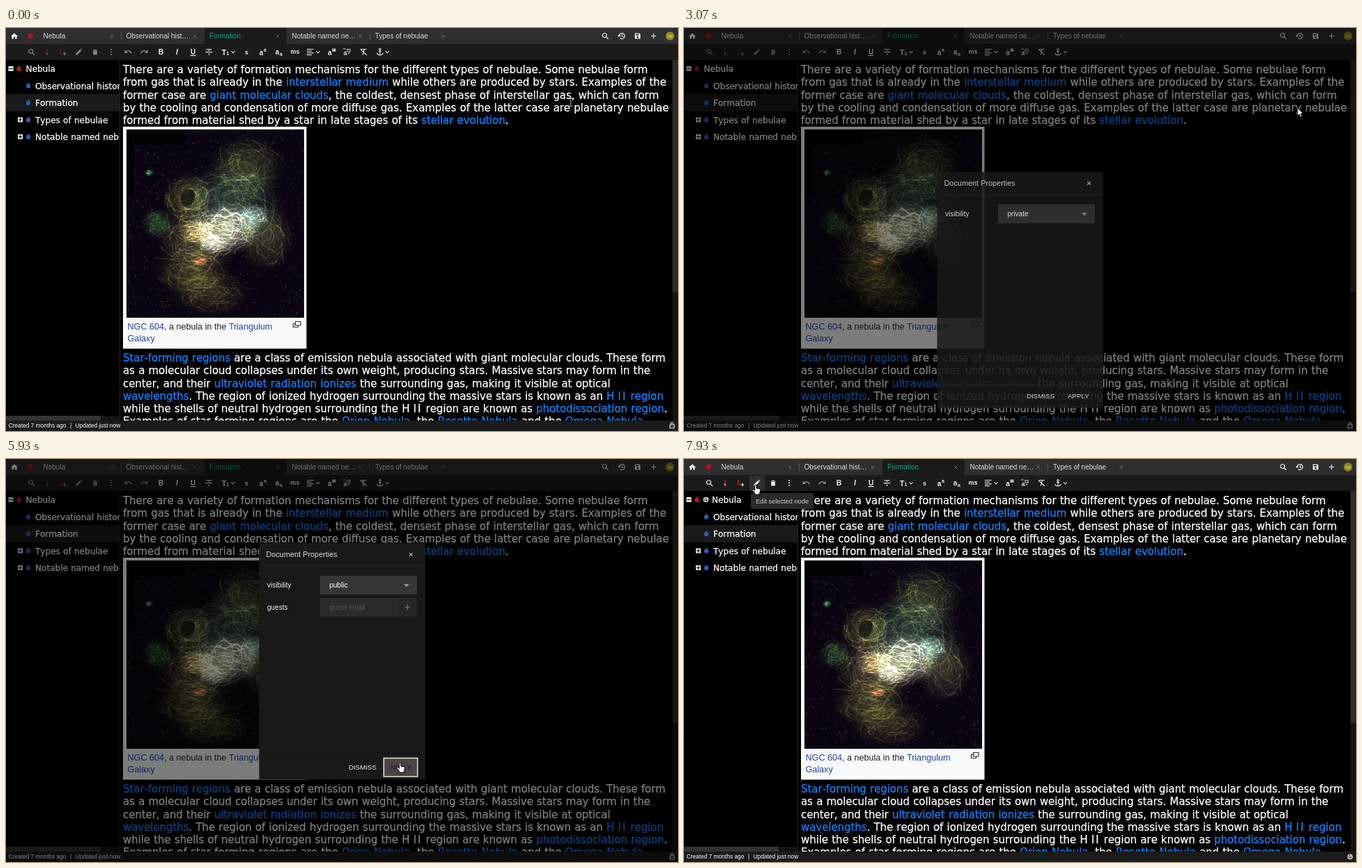
An HTML page with a canvas for the animation above (8000 ms loop, 965 px wide and 580 px high).

```html
<!DOCTYPE html>
<html lang="en">
<head>
<meta charset="utf-8">
<title>Notes: Nebula</title>
<style>
html, body { margin: 0; width: 100%; height: 100%; overflow: hidden; background: #000; }
svg, canvas { position: absolute; left: 0; top: 0; }
#photo { left: 173px; top: 146px; }
text { font-family: "Liberation Sans", Arial, sans-serif; white-space: pre; stroke-width: 0; }
.doc { font-family: "DejaVu Sans", Verdana, sans-serif; font-kerning: none; letter-spacing: -.0045em; word-spacing: .037em; stroke-width: .25; }
.mid { text-anchor: middle; }
.line { fill: none; stroke: currentColor; stroke-width: 1.2; }
.fill { fill: currentColor; fill-rule: evenodd; }
</style>
</head>
<body>
<svg id="page" width="965" height="580"></svg>
<canvas id="photo" width="255" height="271"></canvas>
<svg id="front" width="965" height="580"></svg>
<script>
const $ = id => document.getElementById(id);
const text = (x, y, size, str, fill = '#fff', attrs = '') =>
  `<text x="${x}" y="${y}" font-size="${size}" fill="${fill}" stroke="${fill}" ${attrs}>${str}</text>`;
const rect = (x, y, w, h, fill, attrs = '') =>
  `<rect x="${x}" y="${y}" width="${w}" height="${h}" fill="${fill}" ${attrs}/>`;
const icon = (x, y, d, kind = 'line', color = '#ddd', attrs = '') =>
  `<path class="${kind}" color="${color}" transform="translate(${x} ${y})" d="${d}" ${attrs}/>`;
const dot = (x, y, r, fill) => `<circle cx="${x}" cy="${y}" r="${r}" fill="${fill}"/>`;
const MID = 'class="mid"', BOLD = 'class="mid" font-weight="700"';

const SEARCH = 'M1.2 1.2L4.5 4.5M2-1a3 3 0 1 1-6 0a3 3 0 1 1 6 0';
const HOME = 'M-5 .5L0-4L5 .5H3.5V4H1V1H-1V4H-3.5V.5Z';
const HISTORY = 'M-4 0a4 4 0 1 1 1.2 2.9M-5.6-1L-4 .6L-2.4-1M.2-2.2V.3L2 1.3';
const SAVE = 'M-4-4H2.5L4-2.5V4H-4ZM-2.7-2.8V-.8H1.6V-2.8ZM0 .3a1.4 1.4 0 1 0 .01 0Z';
const PLUS = 'M-3.7 0H3.7M0-3.7V3.7';
const CROSS = 'M-2.3-2.3L2.3 2.3M2.3-2.3L-2.3 2.3';
const PENCIL = 'M-4.2 4.2V2.2L1.6-3.6L3.6-1.6L-2.2 4.2ZM2.3-4.2L3-4.9L4.9-3L4.2-2.3Z';
const TRASH = 'M-3.3-3H-1.2L-.6-4H.6L1.2-3H3.3V-2H-3.3ZM-2.8-1.4H2.8V4H-2.8Z';
const UNDO = 'M-4.5-2.5V1H-1M-4 .5C-2-2.5 3-2.5 4.8 2';
const REDO = 'M4.5-2.5V1H1M4 .5C2-2.5-3-2.5-4.8 2';
const CHEVRON = 'M-2.5-1.2L0 1.3L2.5-1.2';
const STRIKE = 'M-4-3.7H4M0-3.7V-1.5M-5 .2H5M0 2V4.5';
const ALIGN = 'M-5-4H5M-5-1.3H2M-5 1.4H5M-5 4.1H2';
const ANCHOR = 'M0-2.5V4.5M-2-.8H2M-4.3 1.2C-4 5.3 4 5.3 4.3 1.2M1.2-3.6a1.2 1.2 0 1 1-2.4 0a1.2 1.2 0 1 1 2.4 0';
const LOCK = 'M-3-1H3V4H-3ZM-1.7-1V-2.5a1.7 1.7 0 0 1 3.4 0V-1M0 1V2.3';
const GLOBE = 'M3.2 0a3.2 3.2 0 1 1-6.4 0a3.2 3.2 0 1 1 6.4 0M-2.6-1L0-.4L-.6 1L-1 2.6M.6-2.8L1 -1L2.8 .6';

// Square brackets mark links.
const rich = (str, link) => str
  .replace(/\bII\b/, '<tspan letter-spacing="1.9">II</tspan>')
  .replace(/\[(.*?)\]/g, `<tspan fill="${link}" stroke="${link}">$1</tspan>`);

const lines = (top, list) => list.map((s, i) =>
  text(168, Math.round(top + i * 18.25), 15, rich(s, '#1083ff'), '#fff', 'class="doc"')).join('');

function treeRow(x, y, label, box) {
  const apple = x < 40 ? '#c01818' : '#2c5cc0';
  const mark = box ? rect(x - 25, y - 3.5, 7, 7, '#eee') +
    icon(x - 21.5, y, box === '+' ? 'M-2.5 0H2.5M0-2.5V2.5' : 'M-2.5 0H2.5', 'line', '#000') : '';
  return mark + dot(x - 10, y + .5, 3.2, apple) +
    icon(x - 10, y, 'M0-2.5L1-4.5', 'line', '#567040') +
    text(x, y + 4.5, 12.15, label, '#fff', 'class="doc"' + (x < 40 ? ' id="root"' : ''));
}

const tabs = [[53.5, 'Nebula', 152], [172.5, 'Observational hist…', 271], [292, 'Formation', 390],
  [410.5, 'Notable named ne…', 508.5], [530, 'Types of nebulae', 628]];

$('page').innerHTML =
  // tree
  rect(0, 95, 163, 25, '#1a1a1a') +
  treeRow(28.5, 58.5, 'Nebula', '-') +
  treeRow(42, 83, 'Observational history') +
  treeRow(42, 107.5, 'Formation') +
  treeRow(42, 132, 'Types of nebulae', '+') +
  treeRow(42, 156.5, 'Notable named nebulae', '+') +
  icon(31.5, 58.5, GLOBE, 'line', '#eee', 'id="rootGlobe"') +
  rect(0, 558, 163, 7, '#141414') + rect(0, 558, 136, 7, '#333') +
  // document
  rect(163, 46, 802, 520, '#000') + rect(163, 46, 1, 520, '#242424') +
  lines(65, [
    'There are a variety of formation mechanisms for the different types of nebulae. Some nebulae form',
    'from gas that is already in the [interstellar medium] while others are produced by stars. Examples of the',
    'former case are [giant molecular clouds], the coldest, densest phase of interstellar gas, which can form',
    'by the cooling and condensation of more diffuse gas. Examples of the latter case are planetary nebulae',
    'formed from material shed by a star in late stages of its [stellar evolution].']) +
  lines(480, [
    '[Star-forming regions] are a class of emission nebula associated with giant molecular clouds. These form',
    'as a molecular cloud collapses under its own weight, producing stars. Massive stars may form in the',
    'center, and their [ultraviolet radiation ionizes] the surrounding gas, making it visible at optical',
    '[wavelengths]. The region of ionized hydrogen surrounding the massive stars is known as an [H II region]',
    'while the shells of neutral hydrogen surrounding the H II region are known as [photodissociation region].',
    'Examples of star-forming regions are the [Orion Nebula], the [Rosette Nebula] and the [Omega Nebula].']) +
  rect(168, 142, 263.5, 319.5, '#f8f9fa') +
  text(174.5, 434, 12.6, rich('[NGC 604], a nebula in the [Triangulum]', '#1f45a5'), '#202122') +
  text(174.5, 451, 12.6, 'Galaxy', '#1f45a5') +
  icon(418, 426.5, 'M-2.5-4H5V1.5H-2.5ZM-2.5-1H-5.5V4H1.5V1.5', 'line', '#333') +
  rect(957, 46, 8, 520, '#141414') + rect(957, 46, 8, 334, '#2c2c2c') +
  // tab bar
  rect(0, 0, 965, 23, '#2f2f2f') + rect(0, 23, 965, 23, '#1b1b1b') +
  rect(285, 0, 118, 30, '#1b1b1b', 'rx="4"') +
  rect(165, 6, 1, 11, '#555') + rect(522, 6, 1, 11, '#555') +
  tabs.map(([x, s, cx], i) => text(x, 15, 10, s, i === 2 ? '#17a085' : '#ddd') +
    icon(cx, 12, CROSS, 'line', '#777', 'style="stroke-width:.8"')).join('') +
  icon(12, 11.5, HOME, 'fill', '#fff') + dot(35, 11.5, 3.8, '#b5121c') +
  rect(919, 0, 23, 23, '#1b1b1b', 'id="plusHover"') +
  icon(860.5, 11.5, SEARCH, 'line', '#eee') + icon(884.5, 11.5, HISTORY, 'line', '#eee') +
  icon(907, 11.5, SAVE, 'fill', '#eee') + icon(930, 11.5, PLUS, 'line', '#eee') +
  dot(953.5, 11.5, 6.2, '#8f8818') + text(953.5, 13.5, 5, 'YM', '#eee', MID) +
  // tree tools
  rect(94, 24, 22, 22, '#2f2f2f', 'id="editHover"') +
  '<g id="tools">' +
  icon(36.5, 34.5, SEARCH, 'line', '#eee') +
  icon(59, 34.5, 'M0-4.5V.5', 'line', '#e02030') + icon(59, 37, 'M-2 0H2M0-2V2', 'line', '#d88') +
  icon(81, 34.5, 'M-3-4.5V2.5H-1', 'line', '#e02030') + icon(84, 37, 'M-2.5 0H2.5M0-2.5V2.5', 'line', '#eee') +
  icon(104.5, 34.5, PENCIL, 'fill', '#eee') + icon(128, 34.5, TRASH, 'fill', '#eee') +
  [31, 34.5, 38].map(y => dot(151, y, 1, '#eee')).join('') + '</g>' +
  // format tools
  icon(175.5, 34.5, UNDO, 'line', '#999') + icon(198.5, 34.5, REDO, 'line', '#999') +
  text(222.5, 38, 10.5, 'B', '#eee', BOLD) +
  text(245.5, 38, 10.5, 'I', '#eee', BOLD + ' font-style="italic"') +
  text(268.5, 37.5, 10, 'U', '#eee', BOLD) + rect(264.5, 39, 8, 1.2, '#eee') +
  icon(291.5, 34.5, STRIKE) +
  text(313, 38.5, 11, 'T', '#eee', BOLD) + text(318.5, 39, 7, '1', '#eee', BOLD) + icon(326, 34.5, CHEVRON) +
  text(345.5, 37.5, 9, 's', '#eee', BOLD) +
  text(366.5, 38.5, 10, 'a', '#eee', BOLD) + text(372, 34, 7, 'a', '#eee', BOLD) +
  text(389.5, 37.5, 10, 'a', '#eee', BOLD) + text(395, 40, 7, 'a', '#eee', BOLD) +
  text(415, 37, 9, 'ms', '#eee', BOLD) +
  icon(437, 34.5, ALIGN) + icon(448, 34.5, CHEVRON) +
  text(465, 38.5, 10, 'a', '#eee', BOLD) + rect(468.5, 29.5, 5, 4.5, '#bbb') +
  text(487, 38.5, 9, 'a', '#eee', BOLD) + icon(489, 34.5, 'M-5-4.5H-1M1-4H5V-.5H1ZM2 3L4.5 1', 'line', '#bbb') +
  icon(513.5, 34.5, 'M-3-4H4.5M1-4L-1.2 4M-4.5-4L4.5 4.5') +
  icon(537, 34.5, ANCHOR) + icon(547.5, 34.5, CHEVRON) +
  // status bar
  rect(0, 565, 965, 15, '#1b1b1b') +
  text(3.5, 575, 8.4, 'Created 7 months ago') + text(92, 575, 8.4, '|') + text(99.5, 575, 8.4, 'Updated just now') +
  icon(956.5, 572, LOCK, 'line', '#ddd', 'id="lock"') + icon(956.5, 572.5, GLOBE, 'line', '#ddd', 'id="globe"');

const tooltip = (id, x, y, w, s) => `<g id="${id}">` + rect(x, y, w, 23, '#2a2a2a', 'rx="3"') +
  text(x + w / 2, y + 14.5, 9.25, s, '#ccc', MID) + '</g>';
const menuItems = ['New...', 'Open...', 'Duplicate...', 'Properties...', 'Import...', 'Export...', 'History...', 'Delete...'];
const options = ['private', 'guests', 'public'];
const ring = (id, x, y, w, h) => rect(x, y, w, h, 'none', `id="${id}" stroke="#efe9dc" stroke-width="1.5"`);

$('front').innerHTML =
  tooltip('menuTip', 859, 26, 82, 'Document menu') +
  tooltip('editTip', 96, 49, 90, 'Edit selected node') +
  '<g id="menu">' + rect(809.5, 25.5, 136, 205, '#242424', 'stroke="#3a3a3a"') +
  menuItems.map((s, i) => text(877.5, 42 + i * 25.5, 10, s, '#ccc', MID + ` id="item${i}"`)).join('') + '</g>' +
  rect(0, 0, 965, 580, '#000', 'id="dim" opacity=".5"') +
  '<g id="dialog">' + rect(363.5, 121, 238.5, 340, '#191919') +
  text(373.5, 141, 10.9, 'Document Properties', '#ddd') + icon(581.5, 137.5, CROSS, 'line', '#bbb') +
  rect(364, 153.5, 238, 1, '#252525') + rect(364, 427, 238, 1, '#252525') +
  text(375, 185, 10, 'visibility', '#eee') +
  rect(451, 168, 139, 27, '#363636') + text(464.5, 185, 10, 'private', '#fff', 'id="value"') +
  '<path d="M571 180H579L575 184Z" fill="#999"/>' + ring('selectRing', 450.5, 166.8, 140, 29) +
  '<g id="guestRow">' + text(375, 217, 10, 'guests', '#eee') +
  rect(451, 200, 139, 27, '#2b2b2b') + rect(563, 200, 27, 27, '#272727') +
  text(464.5, 217, 10, 'guest email', '#555') + icon(576.5, 213.5, PLUS, 'line', '#777') + '</g>' +
  '<g id="drop">' + rect(451.5, 195.5, 138, 37.5, '#393939', 'stroke="#888"') +
  rect(452, 196, 137, 12.2, '#1e90ff', 'id="pick"') +
  options.map((s, i) => text(465.5, 205 + i * 12.3, 10, s)).join('') + '</g>' +
  text(492, 447, 9.75, 'DISMISS', '#eee') +
  rect(543, 431, 47, 25, '#4a4444', 'id="applyHover"') + ring('applyRing', 542.5, 430.5, 48.5, 26.5) +
  text(551, 447, 9.75, 'APPLY', '#eee', 'id="apply"') + '</g>' +
  '<path id="cursor" stroke-width=".9"/>';

// The photograph as soft clouds, thin wisps and stars.
let seed = 7;
const rnd = () => (seed = seed * 16807 % 2147483647) / 2147483647;
const clouds = [
  [150, 110, 60, 50, '62,92,62'], [172, 55, 42, 38, '66,78,34'], [88, 100, 28, 30, '104,104,40'],
  [45, 135, 19, 18, '48,92,40'], [105, 160, 48, 34, '104,98,52'], [95, 205, 42, 28, '80,82,30'],
  [120, 235, 44, 26, '54,54,20'], [200, 155, 32, 38, '80,82,44'], [182, 126, 18, 16, '120,160,150'],
  [100, 147, 22, 14, '160,140,84'], [145, 142, 38, 30, '210,205,175'], [122, 164, 18, 12, '180,195,180'],
  [105, 190, 10, 5, '170,70,40'], [32, 62, 5, 4, '80,190,110']];

function paintPhoto() {
  const c = $('photo').getContext('2d');
  c.fillStyle = '#0b0511';
  c.fillRect(0, 0, 255, 271);
  for (let i = 0; i < 1100; i++) {
    const s = .5 + rnd() * .8;
    c.fillStyle = `hsla(${rnd() * 360},40%,60%,${.15 + rnd() * .5})`;
    c.fillRect(rnd() * 255, rnd() * 271, s, s);
  }
  c.globalCompositeOperation = 'lighter';
  for (const [x, y, rx, ry, rgb] of clouds) {
    c.save();
    c.translate(x, y);
    c.scale(rx * 1.3, ry * 1.3);
    const g = c.createRadialGradient(0, 0, 0, 0, 0, 1);
    g.addColorStop(0, `rgba(${rgb},.6)`);
    g.addColorStop(1, `rgba(${rgb},0)`);
    c.fillStyle = g;
    c.fillRect(-1, -1, 2, 2);
    c.restore();
    c.strokeStyle = `rgba(${rgb},.3)`;
    for (let i = 0; i < rx * 2.5; i++) {
      const a = rnd() * 6.283, d = Math.sqrt(rnd()) * 1.1;
      let px = x + Math.cos(a) * d * rx, py = y + Math.sin(a) * d * ry, way = a + 1.2 + rnd();
      c.lineWidth = .4 + rnd() * 1.2;
      c.beginPath();
      c.moveTo(px, py);
      for (let n = 0; n < 8; n++) {
        way += (rnd() - .4) * .9;
        c.lineTo(px += Math.cos(way) * rx * .08, py += Math.sin(way) * ry * .08);
      }
      c.stroke();
    }
  }
  c.globalCompositeOperation = 'source-over';
  c.fillStyle = '#030206';
  c.beginPath();
  c.ellipse(88, 99, 10, 13, .4, 0, 7);
  c.globalAlpha = .6;
  c.fill();
  c.globalAlpha = 1;
  c.fillRect(0, 0, 84, 22);
  c.fillRect(0, 22, 11, 75);
}

const ARROW = 'M0 0V11.5L2.7 9L4.6 13.3L6.5 12.4L4.6 8.3H8.2Z';
const HAND = 'M-1.2 1C-1.2-.4 1-.4 1 1V5L5.5 6C6.8 6.4 6.8 7.5 6.5 9L5.6 12V14H-1.2V12.3L-4.5 8C-5 6.8-3.6 6.2-2.8 7L-1.2 8.5Z';
const BEAM = 'M-2.5-5.5H-.7L0-5L.7-5.5H2.5M0-5V5M-2.5 5.5H-.7L0 5L.7 5.5H2.5';

// Pointer stops: tick (1/15 s), x, y.
const stops = [[0, 811, 107], [9, 811, 107], [22, 929, 21], [24, 930, 15], [32, 930, 15], [39, 881, 115],
  [46, 881, 115], [55, 546, 177], [56, 543, 179], [60, 543, 179], [66, 516, 211], [70, 516, 221],
  [74, 516, 221], [87, 566, 437], [89, 566, 437], [92, 554, 436], [96, 551, 416], [99, 551, 416],
  [112, 119, 92], [117, 103, 37], [120, 103, 37]];

const clamp = v => Math.min(1, Math.max(0, v));
function pointerAt(k) {
  const i = stops.findIndex(s => s[0] > k), [k0, x0, y0] = stops[i - 1], [k1, x1, y1] = stops[i];
  const p = (k - k0) / (k1 - k0), e = p * p * (3 - 2 * p);
  return [x0 + (x1 - x0) * e, y0 + (y1 - y0) * e];
}

function pointerShape(k, x, y) {
  const overText = y > 46 && x > 163;
  if (k < 43) return k >= 23 ? HAND : overText ? BEAM : ARROW;
  if (k < 86) return ARROW;
  if (k < 91 || k >= 116) return HAND;
  return overText ? BEAM : ARROW;
}

const show = (id, on) => { $(id).style.display = on ? '' : 'none'; };
const set = (id, name, value) => $(id).setAttribute(name, value);

function draw(k) {
  const [x, y] = pointerAt(k), shape = pointerShape(k, x, y), beam = shape === BEAM;
  set('cursor', 'd', shape);
  set('cursor', 'transform', `translate(${x} ${y})`);
  set('cursor', 'fill', beam ? 'none' : '#fff');
  set('cursor', 'stroke', beam ? '#ccc' : '#000');

  show('plusHover', k >= 23 && k < 34);
  show('menuTip', k >= 24 && k < 28);
  set('menuTip', 'opacity', clamp((k - 23) / 3));
  show('menu', k >= 28 && k < 43);
  set('item3', 'fill', k >= 38 ? '#fff' : '#ccc');

  // The dialog flies in from below and leaves the same way.
  const away = k < 60 ? (1 - clamp((k - 44.57) / 3)) ** 3 : clamp((k - 89.44) / 3) ** 3;
  show('dim', k >= 44 && k < 90);
  show('dialog', away < 1);
  set('dialog', 'transform', `translate(0 ${away * 600})`);
  set('dialog', 'opacity', 1 - away);
  show('drop', k >= 60 && k < 75);
  set('pick', 'y', 196 + 12.2 * (y < 208 ? 0 : y < 220 ? 1 : 2));
  show('selectRing', k >= 60 && k < 88);
  show('guestRow', k >= 75);
  $('value').textContent = k < 75 ? 'private' : 'public';
  show('applyHover', k >= 86);
  show('applyRing', k >= 88);
  set('apply', 'fill', k >= 88 ? '#161414' : '#eee');

  const shared = k >= 94;
  show('rootGlobe', shared);
  show('globe', shared);
  show('lock', !shared);
  set('root', 'x', shared ? 40 : 28.5);

  set('tools', 'opacity', .5 + .5 * clamp((k - 112) / 3));
  show('editHover', k >= 116);
  show('editTip', k >= 117);
  set('editTip', 'opacity', clamp((k - 116) / 3));
}

function loop() {
  draw(Math.floor((performance.now() % 8000 + 5) * .015) % 120);
  requestAnimationFrame(loop);
}
paintPhoto();
loop();
</script>
</body>
</html>
```
